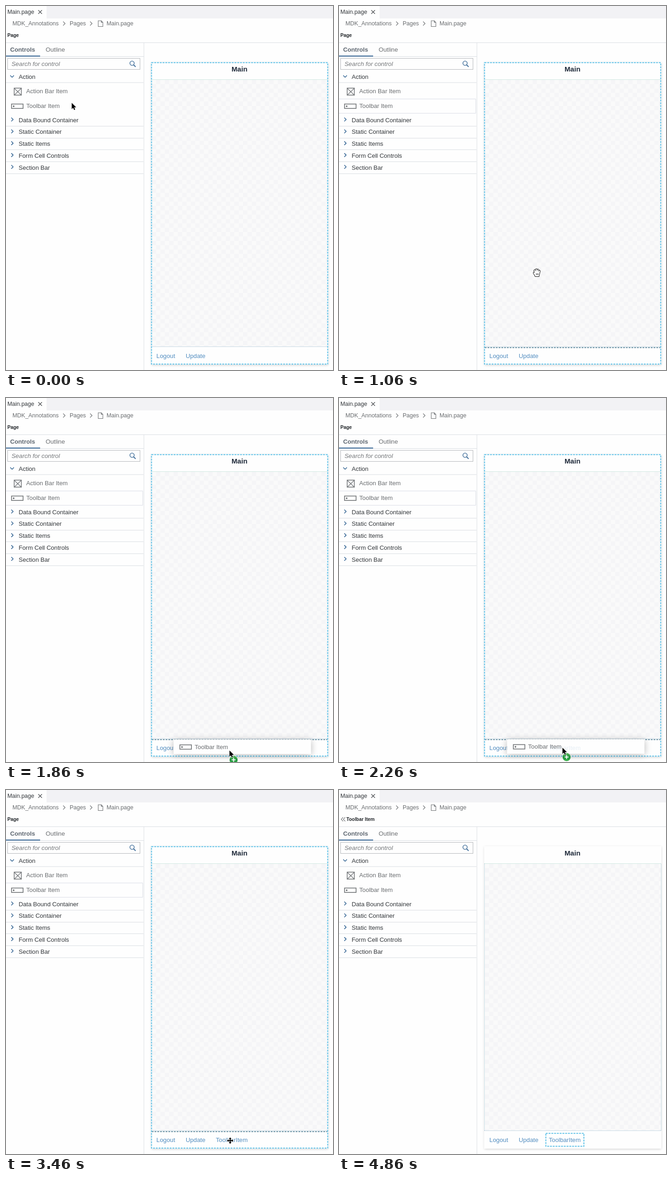
Write an HTML page with a canvas that moves like this. It is 709 px wide and 789 px high and loops after 5200 ms.

```html
<!DOCTYPE html>
<html lang="en">
<head>
<meta charset="utf-8">
<title>Page editor</title>
<style>
html, body { margin: 0; width: 100%; height: 100%; overflow: hidden; background: #fefefe; }
canvas { display: block; width: 709px; height: 789px; }
</style>
</head>
<body>
<canvas id="stage"></canvas>
<script>
const W = 709, H = 789, LOOP = 5200;
const canvas = document.getElementById('stage');
const g = canvas.getContext('2d');
const ratio = window.devicePixelRatio || 1;
canvas.width = W * ratio;
canvas.height = H * ratio;

const BG = '#fefefe', LINE = '#d9dde2', BLUE = '#2f6191', LINK = '#528dc0';
const DARK = '#32363a', GREY = '#6a6d70', SELECT = '#5cc0e6';

// Each pose holds until the next one; ghost is the offset of the dragged row.
const poses = [
  { at: 0, cursor: 'arrow', x: 142.5, y: 210 },
  { at: 60, cursor: 'hand', x: 144, y: 213 },
  { at: 860, cursor: 'hand', x: 278, y: 273 },
  { at: 1060, cursor: 'hand', x: 429, y: 578 },
  { at: 1260, cursor: 'hand', x: 512, y: 687 },
  { at: 1460, cursor: 'copy', x: 462.5, y: 665, ghost: [344, 444.5] },
  { at: 1660, cursor: 'copy', x: 463, y: 702, ghost: [345, 482] },
  { at: 1860, cursor: 'copy', x: 484.5, y: 764, ghost: [365, 539.3] },
  { at: 2060, cursor: 'copy', x: 484.5, y: 764, ghost: [365.5, 539] },
  { at: 2260, cursor: 'copy', x: 484.5, y: 758, ghost: [366, 538.8] },
  { at: 2460, cursor: 'arrow', x: 482, y: 768 },
  { at: 2660, cursor: 'arrow', x: 482, y: 769 },
  { at: 3060, cursor: 'arrow', x: 484, y: 758 },
  { at: 3260, cursor: 'move', x: 486, y: 759.5 },
  { at: 3460, cursor: 'move', x: 486, y: 760 },
  { at: 3860, cursor: 'arrow', x: 484, y: 756 },
  { at: 4060, cursor: 'arrow', x: 480, y: 747 },
  { at: 4260, cursor: 'none' }
];

function text(str, x, cy, size, color, style = '') {
  g.font = `${style} ${size}px "Liberation Sans", Arial, sans-serif`;
  g.fillStyle = color;
  g.fillText(str, x, cy + size * 0.36);
}

function rect(x, y, w, h, color) {
  g.fillStyle = color;
  g.fillRect(x, y, w, h);
}

function path(points, color, width = 1) {
  g.beginPath();
  points.forEach(([x, y]) => g.lineTo(x, y));
  g.strokeStyle = color;
  g.lineWidth = width;
  g.stroke();
}

function box(x, y, w, h, color, width = 1, dash = []) {
  g.setLineDash(dash);
  g.strokeStyle = color;
  g.lineWidth = width;
  g.strokeRect(x, y, w, h);
  g.setLineDash([]);
}

function dashLine(x1, y1, x2, y2, color, width, dash) {
  g.setLineDash(dash);
  path([[x1, y1], [x2, y2]], color, width);
  g.setLineDash([]);
}

function shadowCard(x, y, w, h, color, blur, drop) {
  g.save();
  g.shadowColor = color;
  g.shadowBlur = blur * ratio;
  g.shadowOffsetY = drop * ratio;
  rect(x, y, w, h, BG);
  g.restore();
}

const chevronRight = (x, y, s, color, width) =>
  path([[x - s / 2, y - s], [x + s / 2, y], [x - s / 2, y + s]], color, width);

function toolbarRow(dx, dy) {
  box(12 + dx, 212.5 + dy, 25, 9.5, '#75787b', 1.7);
  rect(15 + dx, 215.7 + dy, 3.2, 3.2, '#75787b');
  text('Toolbar Item', 44 + dx, 216.5 + dy, 13.2, GREY);
}

function drawHeader(itemSelected) {
  rect(88, 0, W - 88, 27, '#f2f2f5');
  text('Main.page', 3, 13, 12.45, DARK);
  path([[70, 9], [78, 17]], '#4a4d50', 1.2);
  path([[78, 9], [70, 17]], '#4a4d50', 1.2);

  text('MDK_Annotations', 14, 38, 12.45, GREY);
  chevronRight(126, 38, 4.3, GREY, 1.2);
  text('Pages', 138, 38, 12.45, GREY);
  chevronRight(184.5, 38, 4.3, GREY, 1.2);
  path([[206.5, 32], [200, 32], [200, 44.5], [210, 44.5], [210, 35.5],
        [206.5, 32], [206.5, 35.5], [210, 35.5]], GREY, 1.1);
  text('Main.page', 218, 38, 12.45, GREY);

  if (itemSelected) {
    for (const x of [5, 9.5]) path([[x + 4, 59], [x, 63.5], [x + 4, 68]], '#55585c', 1.1);
    text('Toolbar Item', 16, 63.5, 10.35, '#22262a', 'bold');
  } else {
    text('Page', 3, 63.5, 10.4, '#22262a', 'bold');
  }
  rect(0, 79, W, 1, LINE);
}

function drawPanel(rowHover) {
  rect(298.5, 79, 1, H - 79, LINE);
  text('Controls', 9, 94, 13.15, '#5d6670', 'bold');
  text('Outline', 86, 94, 13.2, GREY);
  rect(0, 109, 299, 1, LINE);
  rect(0, 107.5, 74, 2, BLUE);

  box(3.5, 113.5, 287, 24, '#b4b7ba');
  text('Search for control', 12, 125.5, 13.3, '#74777a', 'italic');
  g.beginPath();
  g.arc(273.3, 124, 4.6, 0, Math.PI * 2);
  g.strokeStyle = BLUE;
  g.lineWidth = 1.4;
  g.stroke();
  path([[276.6, 127.3], [281, 131.8]], BLUE, 1.8);

  path([[9.2, 150.5], [13.2, 154.5], [17.2, 150.5]], BLUE, 1.5);
  text('Action', 27.5, 153, 13.1, DARK);
  rect(0, 165.5, 298, 1, LINE);

  box(17.7, 178, 15.6, 15.2, '#75787b', 1.6);
  path([[18, 178.5], [33, 193]], '#75787b', 1.4);
  path([[33, 178.5], [18, 193]], '#75787b', 1.4);
  text('Action Bar Item', 43.7, 184.5, 13.2, GREY);

  if (rowHover) path([[0, 201.5], [296.5, 201.5], [296.5, 232.5], [0, 232.5]], '#d9dce6');
  toolbarRow(0, 0);

  ['Data Bound Container', 'Static Container', 'Static Items',
   'Form Cell Controls', 'Section Bar'].forEach((name, i) => {
    const y = 247 + i * 25.7;
    chevronRight(13.5, y - 1, 4, BLUE, 1.5);
    text(name, 27.5, y, 13.1, DARK);
    rect(0, Math.round(y + 13), 298, 1, LINE);
  });
}

function drawChecker(x, y, w, h, cell) {
  g.save();
  g.beginPath();
  g.rect(x, y, w, h);
  g.clip();
  rect(x, y, w, h, '#fafafa');
  for (let r = 0; r * cell < h; r++) {
    for (let c = (r + 1) % 2; c * cell < w; c += 2) {
      rect(x + c * cell, y + r * cell, cell, cell, '#f5f5f7');
    }
  }
  g.restore();
}

function drawPreview(t) {
  const selected = t >= 3660;
  shadowCard(314.5, 121.5, 384.5, 656, 'rgba(0,0,0,0.2)', 5, 1);
  text('Main', 489, 137, 15.1, '#1f2a3a', 'bold');
  drawChecker(316, 160, 382, 578, 9.43);
  dashLine(315, 159.5, 698, 159.5, '#b9dcd3', 1, [2, 1]);
  dashLine(315, 738.5, 698, 738.5, '#adc6d6', 1, [2, 1]);

  text('Logout', 326, 758.5, 13.3, LINK);
  text('Update', 389.7, 758.5, 13.2, LINK);
  if (t >= 2460) text('ToolbarItem', 455, 758.5, 13.2, LINK);

  if (selected) {
    dashLine(315.5, 160, 315.5, 738, '#b5d2de', 1, [2, 1]);
    dashLine(698.5, 160, 698.5, 738, '#b5d2de', 1, [2, 1]);
    box(448.5, 744.3, 82.5, 28, SELECT, 2, [4, 2]);
  } else {
    if (t >= 1060) dashLine(316, 740.5, 697, 740.5, '#3d7088', 1.6, [4, 2]);
    box(315.5, 122.8, 382, 653.4, SELECT, 2, [4, 2]);
  }
}

function drawGhost([dx, dy], t) {
  shadowCard(dx - 1.7, dy + 201, 298, 31.5, 'rgba(0,0,0,0.28)', 15, 2);
  toolbarRow(dx, dy);
  if (t >= 2260) {
    g.globalAlpha = 0.14;
    text('ToolbarItem', 455, 758.5, 13.2, LINK);
    g.globalAlpha = 1;
  }
}

const arrow = new Path2D('M0 0V13.4L3.1 10.6L5.2 15.4L7.4 14.4L5.4 9.8L9.6 9.6Z');
const hand = new Path2D('M-3.6 8L-4.3 5.6C-5.4 4-7.4 2-7.4.6C-7.4-.9-5.7-.7-4.6.6' +
  'L-6-4C-6.4-6-4.3-6.7-3.6-4.8L-2.6-2.4V-6.6C-2.5-8.4-.2-8.4 0-6.6L.5-2.7' +
  'L1.2-6.3C1.6-8 3.8-7.6 3.6-5.8L3.2-2L4.5-4C5.6-5.3 7.3-4.4 6.8-2.9L5.6 2C5.4 4 4.6 5 4.4 8Z');
const move = new Path2D('M0-7L3-3.6H1.1V-1.1H3.6V-3L7 0L3.6 3V1.1H1.1V3.6H3' +
  'L0 7L-3 3.6H-1.1V1.1H-3.6V3L-7 0L-3.6-3V-1.1H-1.1V-3.6H-3Z');

function drawShape(shape, fill, stroke, width) {
  g.lineWidth = width;
  g.strokeStyle = stroke;
  g.stroke(shape);
  g.fillStyle = fill;
  g.fill(shape);
}

function drawBadge(x, y) {
  const fill = g.createLinearGradient(0, y - 9, 0, y + 9);
  fill.addColorStop(0, '#58b957');
  fill.addColorStop(0.5, '#1e913d');
  fill.addColorStop(1, '#38b548');
  g.beginPath();
  g.arc(x, y, 9, 0, Math.PI * 2);
  g.fillStyle = fill;
  g.fill();
  g.strokeStyle = '#dfeee0';
  g.lineWidth = 0.8;
  g.stroke();
  path([[x - 4.3, y], [x + 4.3, y]], '#fff', 2);
  path([[x, y - 4.3], [x, y + 4.3]], '#fff', 2);
}

function drawCursor({ cursor, x, y }) {
  if (cursor === 'none') return;
  g.save();
  g.translate(x, y);
  g.lineJoin = 'round';
  if (cursor === 'hand') {
    drawShape(hand, '#fff', '#111', 2);
    for (const fx of [-1.3, 0.8, 2.9]) path([[fx, 1.5], [fx, 5]], '#222', 0.9);
  } else if (cursor === 'move') {
    drawShape(move, '#000', '#fff', 2);
  } else {
    if (cursor === 'copy') drawBadge(9, 20.3);
    drawShape(arrow, '#000', '#fff', 1.8);
  }
  g.restore();
}

function draw(t) {
  const pose = poses.filter(p => p.at <= t).pop();
  g.setTransform(ratio, 0, 0, ratio, 0, 0);
  rect(0, 0, W, H, BG);
  drawHeader(t >= 3860);
  drawPanel(t >= 60 && t < 3660);
  drawPreview(t);
  if (pose.ghost) drawGhost(pose.ghost, t);
  drawCursor(pose);
}

const start = performance.now();
function tick() {
  draw((performance.now() - start) % LOOP);
  requestAnimationFrame(tick);
}
tick();
</script>
</body>
</html>
```
